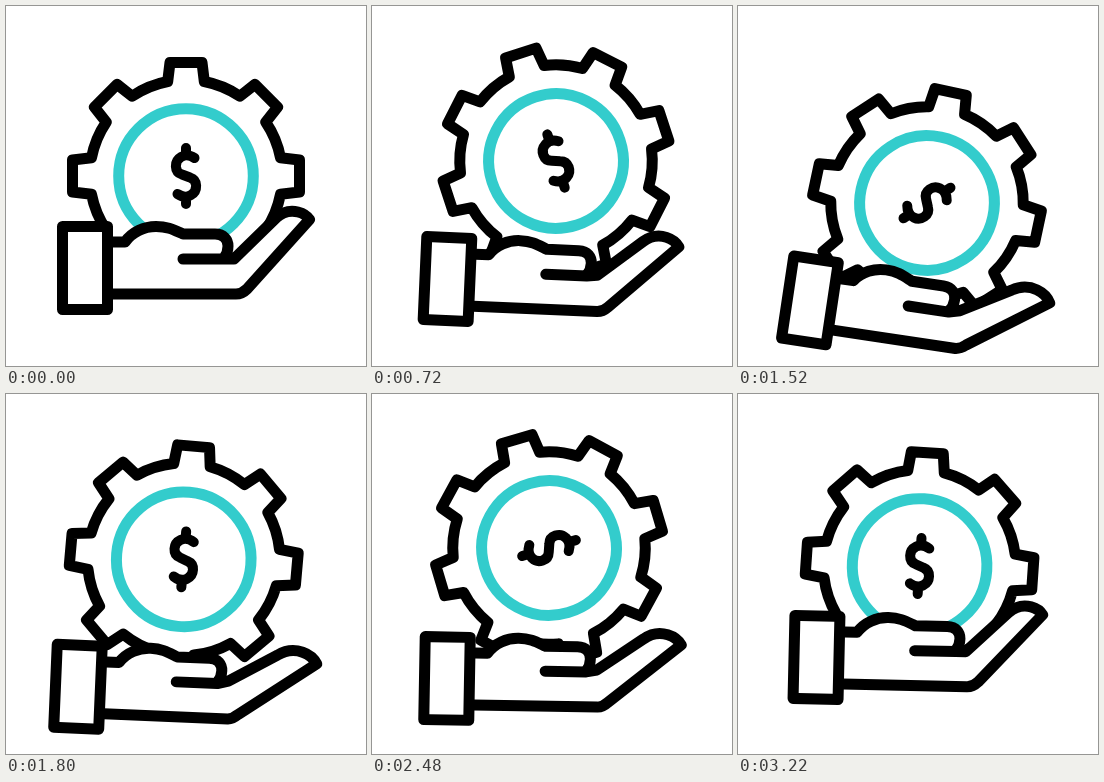
These frames come from a looping animation (360x360 px, 3.24 s). An HTML page:

```html
<!DOCTYPE html>
<html lang="en">
<head>
<meta charset="utf-8">
<title>Gear in hand</title>
<style>
  html, body { margin: 0; width: 100%; height: 100%; overflow: hidden; background: #fff; }
  svg { display: block; width: 100vw; height: 100vh; }
</style>
</head>
<body>
<svg viewBox="0 0 360 360" fill="none" stroke="#000" stroke-width="11" stroke-linecap="round" stroke-linejoin="round">
  <g id="gear">
    <path id="rim"/>
    <circle r="67.3" stroke="#33cccc"/>
    <path stroke-width="10" d="M0 -28V-21M8.5 -18C4 -21 -1 -21.5 -5 -19C-12 -15 -12 -4 -4 -1.5L4 1.5C12 4 12 15 5 19C1 21.5 -4 21 -8.5 18M0 21V28"/>
  </g>
  <g id="hand">
    <path id="palm" fill="#fff" stroke="none"/>
    <path id="lines"/>
    <path fill="#fff" d="M56.5 220.5H101.5V303.5H56.5Z"/>
  </g>
</svg>
<script>
const LOOP = 3240;
const $ = id => document.getElementById(id);

// time, gear x, gear y, gear angle, hand dx, hand dy, hand angle, finger opening
const KEYS = [
  [260, 180, 170, 0, 0, 0, 0, 0],
  [480, 181.5, 160, -4, -1.3, 4, 0.8, 0.13],
  [720, 184, 155, -18, -3.5, 11, 2.5, 0.4],
  [820, 185.5, 158, -26, -4, 15, 3.8, 0.5],
  [1040, 188, 174, -49.6, -5, 22.5, 6.5, 0.65],
  [1340, 189.5, 192, -93, -6.8, 31, 8.5, 0.9],
  [1520, 189, 197, -122.8, -7, 32.5, 8.5, 1],
  [1880, 174, 156, -190, -7, 30, 0.5, 1],
  [2080, 166, 141.5, -228, -6.5, 27.5, -3, 1],
  [2280, 170, 144.5, -259, -5.3, 25.5, -1.5, 0.87],
  [2480, 177, 154, -286.4, -4, 22.5, 1, 0.7],
  [2760, 182, 173, -315, -2.8, 16.5, 2.3, 0.5],
  [3000, 183, 176.5, -337, -1.6, 10, 2.2, 0.25],
  [3220, 181.6, 172, -356, -0.5, 1.5, 1.3, 0.05],
  [3260, 180, 170, -360, 0, 0, 0, 0]
];
const LAST = KEYS.length - 1;

const slope = (i, c) => (KEYS[i + 1][c] - KEYS[i][c]) / (KEYS[i + 1][0] - KEYS[i][0]);

// tangent that never overshoots its neighbours
function tangent(i, c) {
  if (i === 0) return 0;
  if (i === LAST) return slope(i - 1, c);
  const a = slope(i - 1, c), b = slope(i, c);
  return a * b <= 0 ? 0 : 2 * a * b / (a + b);
}

function pose(t) {
  if (t <= KEYS[0][0]) return KEYS[0];
  let i = 0;
  while (i < LAST - 1 && t > KEYS[i + 1][0]) i++;
  const p = KEYS[i], q = KEYS[i + 1], h = q[0] - p[0], u = (t - p[0]) / h;
  const s = u * u * (3 - 2 * u);
  return p.map((v, c) => c === 0 ? t :
    v + (q[c] - v) * s +
    h * u * (1 - u) * ((1 - u) * tangent(i, c) - u * tangent(i + 1, c)));
}

function gearPath() {
  const tooth = [[-18.3, -94.5], [-16, -113.5], [16, -113.5], [18.3, -94.5]];
  let d = "";
  for (let i = 0; i < 8; i++) {
    const a = i * Math.PI / 4, c = Math.cos(a), s = Math.sin(a);
    tooth.forEach(([x, y], j) => {
      const cmd = j ? "L" : i ? "A96.3 96.3 0 0 1 " : "M";
      d += `${cmd}${(x * c - y * s).toFixed(2)} ${(x * s + y * c).toFixed(2)}`;
    });
  }
  return d + "A96.3 96.3 0 0 1 -18.3 -94.5Z";
}

function drawHand(k) {
  const pt = (x, y, X, Y) => `${x + (X - x) * k} ${y + (Y - y) * k} `;
  const thumb = "M106 236H119C126 226 138 220.5 150 220.5C162 220.5 168 224 177 228H209C218 228 222 234 222 240";
  const finger =
    "L" + pt(228, 253, 229, 250) +
    "L" + pt(270, 212, 277, 222) +
    "Q" + pt(280, 203, 289, 214) + pt(292, 206, 302, 218) +
    "Q" + pt(300, 208, 312, 221) + pt(303.5, 213.5, 316.5, 229) +
    "L" + pt(241, 283, 240, 283) +
    "Q" + pt(236, 288, 235, 287.5) + "230 288H106";
  $("palm").setAttribute("d", thumb + "Q222 247 218 253" + finger + "Z");
  $("lines").setAttribute("d", thumb + "Q222 247 218 252M177 253H218" + finger);
}

function draw(t) {
  const [, gx, gy, ga, hx, hy, ha, k] = pose(t);
  $("gear").setAttribute("transform", `translate(${gx} ${gy}) rotate(${ga})`);
  $("hand").setAttribute("transform", `translate(${hx} ${hy}) rotate(${ha} 79.5 261.5)`);
  drawHand(k);
}

$("rim").setAttribute("d", gearPath());
draw(0);
const start = performance.now();
function tick() {
  draw((performance.now() - start) % LOOP);
  requestAnimationFrame(tick);
}
requestAnimationFrame(tick);
</script>
</body>
</html>
```
